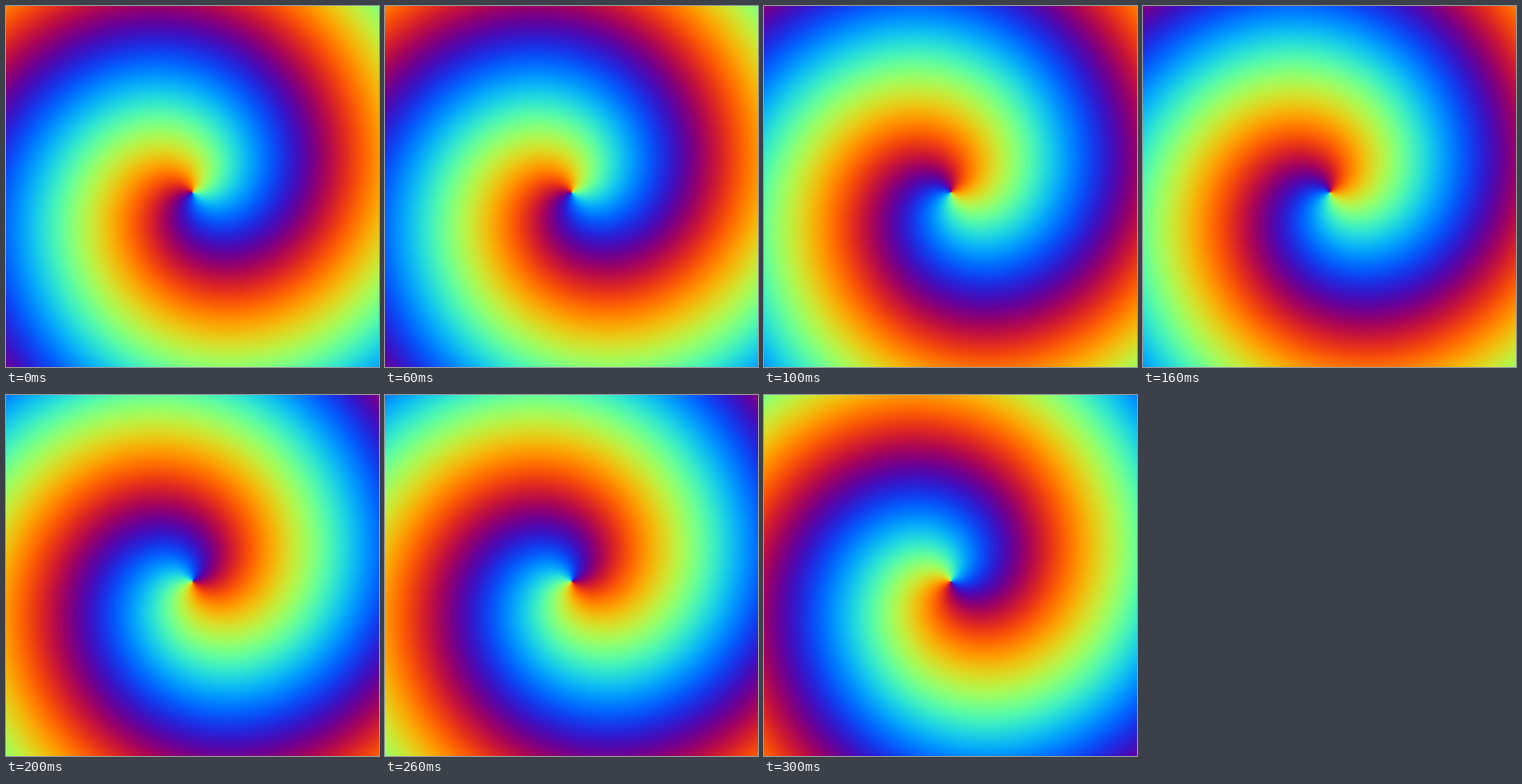
Animation of 500x485 px, one loop 400 ms. Source, as an HTML page with a canvas:

```html
<!DOCTYPE html>
<html lang="en">
<head>
<meta charset="utf-8">
<title>Colour spiral</title>
<style>
  html, body { margin: 0; width: 100%; height: 100%; overflow: hidden; }
  canvas { display: block; }
</style>
</head>
<body>
<canvas id="stage" width="500" height="485"></canvas>
<script>
const WIDTH = 500, HEIGHT = 485;
const CENTER = 250;
const RADIUS_PER_RADIAN = 50;
const STEPS = 4, STEP_MS = 100;

const context = document.getElementById("stage").getContext("2d");

// Colours cycle through green, azure, purple and orange, a quarter turn apart.
function renderSpiral(turn) {
  const image = context.createImageData(WIDTH, HEIGHT);
  const level = wave => 127.5 * (1 + wave);
  let i = 0;
  for (let y = 0; y < HEIGHT; y++) {
    for (let x = 0; x < WIDTH; x++) {
      const dx = x - CENTER, dy = y - CENTER;
      const phase = Math.hypot(dx, dy) / RADIUS_PER_RADIAN + Math.atan2(dy, dx) - turn;
      const sine = Math.sin(phase);
      image.data[i++] = level(-sine);
      image.data[i++] = level(Math.cos(phase));
      image.data[i++] = level(sine);
      image.data[i++] = 255;
    }
  }
  return image;
}

const spirals = Array.from({ length: STEPS }, (_, k) => renderSpiral(k * 2 * Math.PI / STEPS));

let shown = -1;
const start = performance.now();

function draw(now) {
  const step = Math.floor(Math.max(0, now - start) / STEP_MS) % STEPS;
  if (step !== shown) {
    context.putImageData(spirals[step], 0, 0);
    shown = step;
  }
  requestAnimationFrame(draw);
}
draw(start);
</script>
</body>
</html>
```
